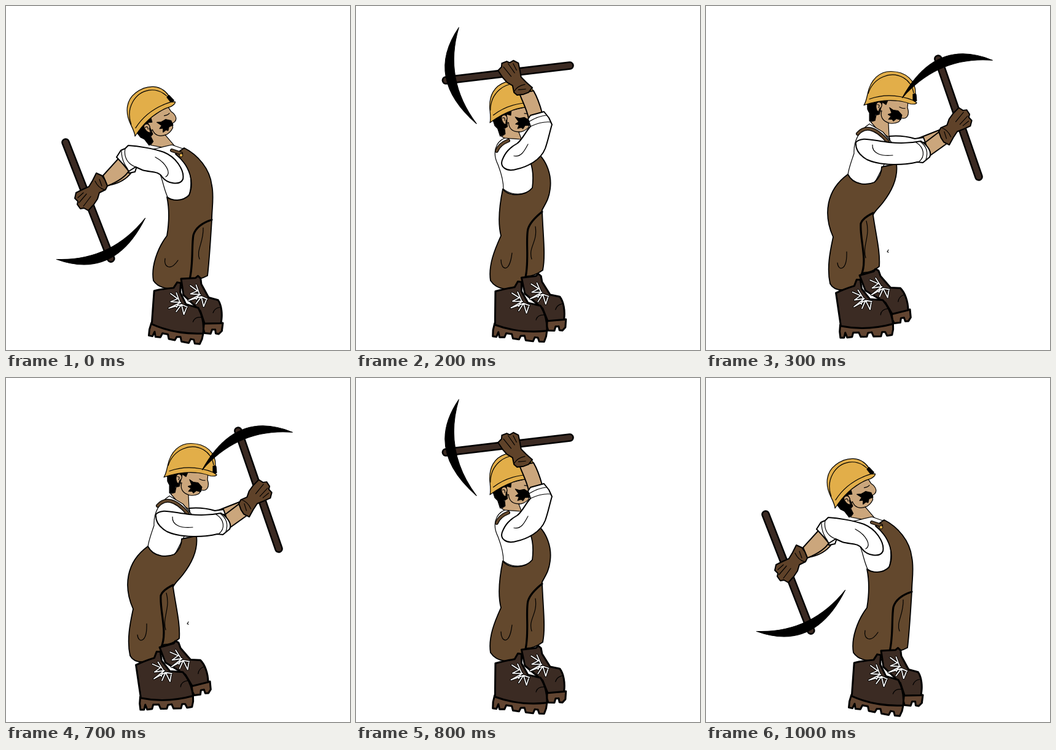
Animation of 560 by 560 pixels, one loop 1.1 s. Source, as an HTML page:

```html
<!DOCTYPE html>
<html lang="en">
<head>
<meta charset="utf-8">
<title>Miner swinging a pickaxe</title>
<style>
  html, body { margin: 0; width: 100%; height: 100%; overflow: hidden; background: #fff; }
  svg { display: block; width: 100vw; height: 100vh; }
  path { stroke: #000; stroke-width: 2; stroke-linejoin: round; stroke-linecap: round; }
  .line { fill: none; }
  .thin { stroke-width: 1.2; }
  .bold { stroke-width: 3.2; }
  .black { fill: #000; stroke-width: 1; }
  .white { fill: #fff; }
  .skin { fill: #cba67c; }
  .denim { fill: #63482d; stroke-width: 1.8; }
  .boot { fill: #3b2b23; stroke-width: 3; }
  .sole { fill: #624531; stroke-width: 3; }
  .glove { fill: #5f4229; }
  .hat { fill: #e2ae49; }
  .lace { fill: none; stroke: #fff; stroke-width: 1.7; }
  .laceEdge { fill: none; stroke-width: 3.6; }
  .strapEdge { fill: none; stroke-width: 6; }
  .strap { fill: none; stroke: #63482d; stroke-width: 3.6; }
  .handleEdge { fill: none; stroke-width: 13.6; }
  .handle { fill: none; stroke: #3b2a22; stroke-width: 8.6; }
</style>
</head>
<body>
<svg viewBox="0 0 560 560">
  <path id="farArm" class="skin"/>
  <path id="farSleeve" class="white"/>

  <g id="head">
    <path class="black" d="M243 158L260 152L275 153L273 160L267 156L261 177L256 176L255 186L246 187L246 174L243 168Z"/>
    <path class="skin thin" d="M267 156L273 160L276 153L309 155L308 165C312 177 307 184 298 182L294 188C288 191 281 191 277 190L278 213L262 204L248 188L255 186L257 177L262 176Z"/>
    <path class="skin thin" d="M265 170C256 178 254 155 261 156C267 156 268 163 263 166L261 171"/>
    <path class="line thin" d="M266 170C263 180 268 187 278 190M259 160Q264 160 261 165M295 164Q301 167 304 166"/>
    <path class="black" d="M279 165L285 169L293 170L299 177L297 185L290 183L285 187L283 184L277 184L281 179L276 176L282 174Z"/>
    <path class="black" d="M317 141L322 143L323 154L317 156Z"/>
    <path class="hat thin" d="M237 161Q240 157 243 143C248 118 263 106 281 106C305 106 322 121 321 142L317 143L317 153L323 157Q322 160 313 159C290 150 263 152 237 161Z"/>
    <path class="line thin" d="M244 142C253 115 281 105 301 116Q315 124 318 141M246 151Q280 139 317 153"/>
  </g>

  <path id="shirt" class="white thin"/>
  <path id="pants" class="denim"/>
  <path id="seam" class="line bold"/>
  <path id="crease" class="line thin"/>
  <path id="strapEdge" class="strapEdge"/>
  <path id="strap" class="strap"/>
  <circle id="button" r="2.8" fill="#e2ae49" stroke="#000"/>

  <g id="boots">
    <path class="sole" d="M282 500L312 494L313 507L309 513L304 513L302 507L297 508L296 515L286 516L283 510Z"/>
    <path class="boot" d="M231 437L254 431L257 427L262 430L265 439L281 458L297 459C304 466 309 480 309 495L283 501L272 482L240 462Z"/>
    <path class="sole" d="M198 517L284 517L284 526L282 535L274 536L271 530L266 530L264 537L252 537L249 530L243 531L241 537L231 537L228 530L219 530L217 537L209 538L206 530L204 538L198 538L197 528Z"/>
    <path class="boot" d="M192 465Q205 459 222 454L226 444L232 444L234 459L247 476L268 478C278 490 283 505 284 517Q240 528 199 519L196 496Z"/>
    <path class="line thin" d="M276 492Q265 493 264 502M302 470Q294 473 293 481"/>
    <g id="laces"></g>
  </g>

  <path id="arm" class="skin"/>
  <path id="sleeve" class="white"/>
  <path id="folds" class="line thin"/>
  <path id="speck" class="line thin" d="M297 397L295 400L297 401"/>

  <g id="pick">
    <path class="handleEdge" d="M0 0H203"/>
    <path class="handle" d="M0 0H203"/>
    <path class="black" d="M162-76Q238 8 172 83Q207 2 162-76Z"/>
    <g transform="rotate(-68.7) translate(-97 -222)">
      <path class="glove" d="M147 272L156 276L161 283L165 293L162 299L152 304L149 314L143 323L134 333L127 329L121 330L116 323L117 318L112 313L114 304L124 299L135 294L141 284Z"/>
      <path class="line thin" d="M145 285Q150 296 160 299M126 304L117 312M131 306L119 320M138 310L126 326M152 282L156 293"/>
    </g>
  </g>
</svg>

<script>
const STEP = 100;
const ORDER = [0, 1, 2, 3, 4, 4, 4, 3, 2, 1, 0];
const $ = id => document.getElementById(id);

// Poses run from the full backswing to the strike.
// boots, head: [x, y, angle] of their anchor; pick: butt of the handle and its angle.
const back = {
  boots: [237.5, 517, 11.5], head: [210, 212, -38], pick: [97, 222, 68.7],
  shirt: "M240 233L270 226L290 233C300 262 304 290 298 307C290 318 272 318 263 311C256 295 255 282 250 272Z",
  pants: "M262 311C270 318 288 318 298 308C306 290 302 262 276 241L290 231C312 242 332 265 335 292C339 310 335 330 335 348C333 380 331 415 328 439Q315 446 301 446L291 457C280 463 250 463 240 447C236 425 246 395 262 374C266 350 266 330 262 311Z",
  seam: "M299 445C305 420 302 390 305 373Q310 356 335 348",
  crease: "M259 411C256 425 268 432 280 414M321 361C322 385 309 398 315 412",
  strap: "M270 235L285 240", button: [285, 243],
  farArm: "M166 292C180 290 194 285 205 270L195 262Z",
  farSleeve: "M198 262L213 261L210 270L200 272Z",
  arm: "M187 244L158 276L165 293C180 287 194 279 201 267Z",
  sleeve: "M199 227C215 228 240 232 257 238C277 246 291 268 288 282C283 293 262 289 254 278C248 268 235 271 222 267L211 262L200 269L191 258L180 246L187 235L194 232Z",
  folds: "M243 246C260 255 270 272 260 278M194 232C191 248 200 258 211 262M188 236Q188 252 198 265"
};

const high = {
  boots: [226.5, 518, 8], head: [218, 190, -18], pick: [348, 97, 173.2],
  shirt: "M242 215L268 217L288 240C292 262 290 285 287 297C275 309 253 309 240 298C240 280 234 266 231 258C222 240 226 222 242 215Z",
  pants: "M239 298C248 310 275 311 287 296C289 280 288 262 282 250L294 238C311 252 319 276 316 298C314 315 308 322 303 332C304 370 309 405 304 430Q290 440 278 440L270 456C255 464 230 464 219 447C215 422 226 396 236 374C230 350 234 322 239 298Z",
  seam: "M276 441C282 415 276 380 280 363Q284 350 303 335",
  crease: "M236 413C236 430 250 436 254 402M292 359C296 385 280 392 286 412",
  strap: "M229 236Q233 225 248 219",
  arm: "M266 142L289 138C296 150 300 163 303 174L281 183C278 168 271 156 266 142Z",
  sleeve: "M238 251C234 262 245 270 260 266C280 262 301 250 308 232C313 218 315 206 319 193L314 182L306 172L284 178L280 184L284 196C275 206 270 219 262 224C250 231 243 238 238 251Z",
  folds: "M284 196C297 190 308 188 317 189M257 244C270 247 276 232 280 225M310 178Q297 179 282 188"
};

const reach = {
  boots: [219.5, 520, -1], head: [257, 161.5, 0], pick: [444, 278, 251],
  shirt: "M266 192C249 203 240 220 241 240C236 255 232 265 231 275C240 292 262 292 275 287L290 258L302 222L288 205Z",
  pants: "M231 274C240 292 262 292 274 287C282 280 286 272 286 262L310 257C313 280 302 302 288 320C282 328 276 332 272 340C276 370 284 400 282 424Q270 434 257 434L250 453C235 464 210 467 202 452C196 425 203 395 207 376C191 340 195 300 231 274Z",
  seam: "M252 440C264 415 250 380 252 354Q255 345 272 337",
  crease: "M214 418C215 432 230 432 229 400M261 350C268 375 254 390 260 410",
  strap: "M247 208C258 195 275 196 296 221",
  farArm: "M344 216L382 201L384 214L352 225Z",
  farSleeve: "M298 212Q320 210 340 216L354 214L357 222L300 224Z",
  arm: "M357 222L382 203L392 224L364 244Z",
  sleeve: "M244 222C252 212 272 219 298 222Q325 225 350 220C362 228 368 238 364 246L353 255L344 254C325 259 285 261 262 250C250 243 243 233 244 222Z",
  folds: "M271 226C270 240 285 245 304 243M342 222C355 230 358 245 346 254M349 221Q364 232 358 250"
};

const strike = {
  boots: [199, 518, 0], head: [237, 161, 0], pick: [276, 400, -30.9],
  shirt: "M247 188C230 198 222 215 221 235C216 255 211 262 214 272C222 288 242 290 260 287L290 270L285 225L275 210Z",
  pants: "M214 270C222 288 248 292 264 288C272 270 272 250 267 226L286 223C290 245 294 262 290 277C275 308 258 325 252 340C256 370 264 400 262 425Q250 433 237 433L230 454C215 465 190 465 181 449C176 420 183 395 187 375C170 335 175 300 214 270Z",
  seam: "M231 440C241 415 228 380 232 354Q238 345 252 338L275 309",
  crease: "M193 424C200 432 213 420 209 402M241 352C247 375 233 385 239 402",
  strap: "M230 204C240 192 255 196 272 226", button: [273, 231],
  farArm: "M304 288L322 297L338 321L326 328Z",
  farSleeve: "M292 275L306 281L309 292L298 298Z",
  arm: "M286 312L306 293Q324 305 336 322L318 335Z",
  sleeve: "M236 205C222 212 218 235 226 255C235 275 255 290 270 303L274 310L286 313C296 310 304 303 307 294L298 277C285 262 273 250 268 236C262 215 250 200 236 205Z",
  folds: "M244 230C236 240 240 254 252 260M270 303C284 306 296 295 296 276M274 310Q294 305 301 283M261 240Q263 248 269 251"
};

// Blend two matching paths halfway.
function midway(a, b) {
  const nums = b.match(/\d+/g);
  let i = 0;
  return a.replace(/\d+/g, n => (+n + +nums[i++]) / 2);
}

const rising = {
  boots: [232, 517.5, 9.8], head: [214, 201, -28], pick: [203, 116, 118],
  shirt: "M241 222L269 221L289 237C297 262 297 288 292 302C282 313 262 313 251 305C249 290 244 272 240 263Z",
  strap: "M242 228Q255 226 272 238", button: [274, 240],
  arm: "M196 189L222 199L218 224L194 213Z",
  sleeve: "M221 194C236 207 252 219 265 229C278 242 283 258 276 270C265 279 249 267 238 254L224 238L212 231L207 221L210 201Z",
  folds: "M221 194C226 211 223 225 224 238M215 198Q219 213 215 231M249 237C261 245 266 254 258 261"
};
for (const part of ["pants", "seam", "crease"]) rising[part] = midway(back[part], high[part]);

const POSES = [back, rising, high, reach, strike];

const lace = "M219 464L232 470L222 477L238 475L221 488L240 478L250 480M228 461L236 474L233 484M240 478L234 491M240 478L247 493L249 482";
$("laces").innerHTML = ["", "translate(29 -19)"].map(shift =>
  `<g transform="${shift}"><path class="laceEdge" d="${lace}"/><path class="lace" d="${lace}"/></g>`).join("");

function place(id, [x, y, angle], ax = 0, ay = 0) {
  $(id).setAttribute("transform", `translate(${x} ${y}) rotate(${angle}) translate(${-ax} ${-ay})`);
}

function draw(pose) {
  for (const id of ["farArm", "farSleeve", "shirt", "pants", "seam", "crease", "strap", "arm", "sleeve", "folds"])
    $(id).setAttribute("d", pose[id] || "");
  $("strapEdge").setAttribute("d", pose.strap);
  place("boots", pose.boots, 199, 518);
  place("head", pose.head, 237, 161);
  place("pick", pose.pick);
  const [cx, cy] = pose.button || [-20, -20];
  $("button").setAttribute("cx", cx);
  $("button").setAttribute("cy", cy);
  $("speck").style.display = pose === reach ? "" : "none";
}

const start = performance.now();
let shown;
function tick() {
  const step = Math.floor((performance.now() - start) / STEP) % ORDER.length;
  const pose = POSES[ORDER[step]];
  if (pose !== shown) draw(shown = pose);
  requestAnimationFrame(tick);
}
tick();
</script>
</body>
</html>
```
